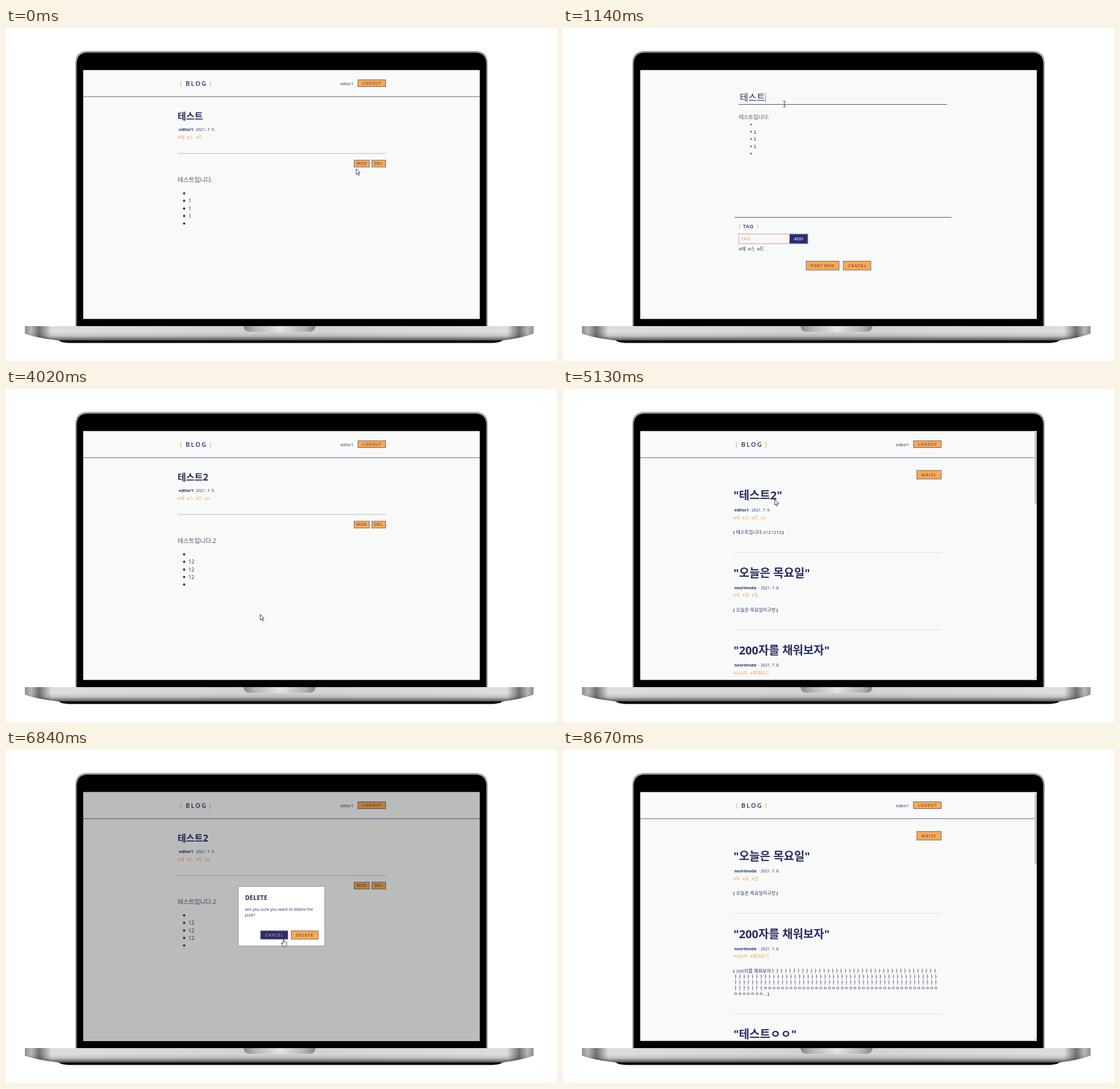
Write an HTML page that moves like this. It is 963x582 px and loops after 8700 ms.

```html
<!DOCTYPE html>
<html lang="ko">
<head>
<meta charset="utf-8">
<title>Blog demo</title>
<style>
html, body { margin: 0; width: 100%; height: 100%; overflow: hidden; background: #fff; }
svg { display: block; width: 963px; height: 582px; }
text { font-family: "Open Sans", "Noto Sans CJK KR", sans-serif; fill: #272e62; white-space: pre; }
.ui { font-family: "Liberation Sans", "Noto Sans CJK KR", sans-serif; }
.b { font-weight: 700; }
.sb { font-weight: 600; }
.soft { fill: #4a5070; }
.or { fill: #f3a052; }
.btn rect { fill: #ffa94f; stroke: #5d5a78; stroke-width: .9; }
.btn.on rect { fill: #28306e; }
.btn.on text { fill: #ffa94f; }
.add rect { fill: #28306e; stroke: none; }
.add text { fill: #fff; }
.add.on rect { fill: #fdf3f3; }
.add.on text { fill: #272e62; }
.head.on text { fill: #9295b7; }
</style>
</head>
<body>
<svg viewBox="0 0 963 582">
  <defs>
    <linearGradient id="base">
      <stop offset="0" stop-color="#8d8d8d"/><stop offset=".012" stop-color="#b8b8b8"/>
      <stop offset=".028" stop-color="#707070"/><stop offset=".052" stop-color="#dedcdc"/>
      <stop offset=".5" stop-color="#d3cfcf"/><stop offset=".948" stop-color="#dedcdc"/>
      <stop offset=".972" stop-color="#707070"/><stop offset=".988" stop-color="#b8b8b8"/>
      <stop offset="1" stop-color="#8d8d8d"/>
    </linearGradient>
    <linearGradient id="shade" x2="0" y2="1">
      <stop offset="0" stop-color="#000" stop-opacity="0"/><stop offset=".45" stop-color="#000" stop-opacity=".12"/>
      <stop offset="1" stop-color="#000" stop-opacity=".62"/>
    </linearGradient>
    <linearGradient id="notch">
      <stop offset="0" stop-color="#858383"/><stop offset=".15" stop-color="#b5b2b2"/>
      <stop offset=".5" stop-color="#e6e3e3"/><stop offset=".85" stop-color="#b5b2b2"/>
      <stop offset="1" stop-color="#858383"/>
    </linearGradient>
    <clipPath id="clip"><rect x="135" y="73.5" width="693" height="435"/></clipPath>
  </defs>
  <path d="M121 521V62Q121 40 143 40H820Q842 40 842 62V521Z" fill="#a3a3a3"/>
  <path d="M123.5 521V63Q123.5 43 143.5 43H819.5Q839.5 43 839.5 63V521Z"/>
  <path d="M90 543H870Q868 550.5 845 550.5H115Q92 550.5 90 543Z" fill="#05050f"/>
  <path id="deck" d="M33 521H922V534Q905 541 868 546H92Q50 541 33 534Z" fill="url(#base)"/>
  <path d="M33 532H922V534Q905 541 868 546H92Q50 541 33 534Z" fill="url(#shade)"/>
  <path d="M415 521H541Q540 531 529 531H427Q416 531 415 521Z" fill="url(#notch)"/>
  <rect x="135" y="73.5" width="693" height="435" fill="#f8fafa"/>
  <g id="screen" clip-path="url(#clip)"></g>
</svg>
<script>
const LOOP = 8700, STEP = 30;
const USER = 'editor1', OTHER = 'noorimoda';
const zones = [];   // hoverable areas
const spans = [];   // parts shown for a limited time

const text = (x, y, size, str, cls = '', ls = 0) =>
  `<text x="${x}" y="${y}" font-size="${size}" class="${cls}" letter-spacing="${ls}">${str}</text>`;
const line = (x1, x2, y, color, w = 1) =>
  `<path d="M${x1} ${y}H${x2}" stroke="${color}" stroke-width="${w}"/>`;
const dot = (x, y, r) => `<circle cx="${x}" cy="${y}" r="${r}" fill="#272e62"/>`;
const during = (from, to, svg) => `<g id="s${spans.push([from, to]) - 1}">${svg}</g>`;
const caret = (from, to, x, y, h) =>
  during(from, to, `<path d="M${x} ${y}v${h}" stroke="#555b80" stroke-width=".7"/>`);
const tags = names => names.map(n => '#' + n).join('\u00a0\u00a0');

function zone(page, x, y, w, h, kind, svg = '', cls = '') {
  const id = 'z' + (zones.push({ page, x, y, w, h, kind }) - 1);
  return `<g id="${id}" class="${cls}">${svg}</g>`;
}
function button(page, label, x, y, w, h, tx, ty, ls = 1.1, font = 'ui', size = 6.3) {
  const svg = `<rect x="${x}" y="${y}" width="${w}" height="${h}"/>` + text(tx, ty, size, label, font, ls);
  return zone(page, x, y, w, h, 'hand', svg, 'btn');
}

function header(page, right) {
  return zone(page, 302, 90, 60, 14, 'hand',
      text(303.5, 101, 11, '{', 'or') + text(314, 101, 11, 'BLOG', 'sb', 2) + text(355, 101, 11, '}', 'or')) +
    text(584.5, 99.8, 6.8, USER) +
    button(page, 'LOGOUT', 615, 90.5, 48.5, 12, 623, 98.9, 1.2) +
    line(100, right, 120, '#5b6585', 1.1);
}
function meta(x, y, who, day) {
  const dx = who === USER ? 26 : 42;
  return text(x, y, 7, who, 'b') + text(x + dx, y, 7, '·') + text(x + dx + 4, y, 7, `2021. 7. ${day}.`);
}

function view(page, extra, tagList) {
  const rows = [289, 302, 315.4, 328.6, 341.8];
  return header(page, 828) +
    text(300, 160, 16, '테스트' + extra, 'b') +
    meta(302, 180.2, USER, 9) +
    text(299.3, 194, 7.7, tags(tagList), 'or') +
    line(300, 664, 219.3, '#b9bbbd') +
    button(page, 'MOD', 608.5, 231, 26.5, 12, 613, 239.4) +
    button(page, 'DEL', 639.5, 231, 24, 12, 643.7, 239.4) +
    text(300, 269, 10.6, '테스트입니다.' + extra, 'soft') +
    rows.map((y, i) => dot(311.3, y, 2) + (i % 4 ? text(318.8, y + 3.4, 9, '1' + extra) : '')).join('');
}

function edit() {
  const rows = [168.7, 181.2, 194, 206.7, 219.2], typed = [0, 1860, 2070, 2280];
  return zone('edit', 307, 108, 364, 29, 'beam') + zone('edit', 307, 146, 364, 180, 'beam') +
    zone('edit', 307, 361, 86, 15, 'beam') +
    text(309, 127.3, 16, '테스트', 'ui') + during(1230, 3570, text(353.6, 127.3, 15.5, '2', 'ui')) +
    line(307, 671, 133.6, '#3d447b') +
    text(307.3, 158.8, 9.2, '테스트입니다.', 'ui soft') + during(1500, 3570, text(360.7, 158.8, 9, '2', 'ui')) +
    rows.map((y, i) => dot(328.6, y, 1.2) + (i % 4 ? text(333, y + 3.3, 9, '1', 'ui') +
      during(typed[i], 3570, text(338, y + 3.3, 9, '2', 'ui')) : '')).join('') +
    caret(960, 1230, 354, 113.5, 17) + caret(1230, 1410, 362.6, 113.5, 17) +
    caret(1410, 1500, 361, 151, 10) + caret(1500, 1740, 366.3, 151, 10) +
    caret(1740, 1860, 338.3, 176, 10) + caret(1860, 1980, 343.3, 176, 10) +
    caret(1980, 2070, 338.3, 189, 10) + caret(2070, 2190, 343.3, 189, 10) +
    caret(2190, 2280, 338.3, 201.5, 10) + caret(2280, 2580, 343.3, 201.5, 10) +
    line(300, 679, 331, '#3d447b') +
    text(307, 349.6, 9, '{', 'or') + text(314.6, 349.6, 9, 'TAG', 'sb', .7) + text(338.4, 349.6, 9, '}', 'or') +
    `<rect x="307" y="360" width="121" height="17" fill="#fdf4f4"/>` +
    zone('edit', 396, 360, 32, 17, 'hand',
      '<rect x="396" y="360" width="32" height="17"/>' + text(403.8, 371, 7.6, 'ADD', 'ui'), 'add') +
    '<rect x="307" y="360" width="121" height="17" fill="none" stroke="#a3a4c2"/>' +
    during(0, 2700, text(311, 371, 7.8, 'TAG', 'ui or', .5)) + during(2910, 3570, text(311, 371, 7.8, 'TAG', 'ui or', .5)) +
    during(2700, 2910, text(311, 371, 7.8, '2', 'ui')) +
    caret(2580, 2700, 311.5, 364, 9) + caret(2700, 2910, 315.8, 364, 9) +
    text(307, 388.7, 7.7, tags(['테', '스', '트'])) + during(2910, 3570, text(355.2, 388.7, 7.7, '#2')) +
    button('edit', 'POST MOD', 425, 407.5, 57.5, 15.5, 433, 417.5, 1) +
    button('edit', 'CANCEL', 490, 407.5, 48, 15.5, 498.6, 417.5);
}

function post(page, y, title, who, day, tagList, body) {
  const last = y + (body.length - 1) * 10.1;
  return zone(page, 298, y - 17, title.length * 17, 22, 'hand', text(298, y, 19.9, `"${title}"`, 'b'), 'head') +
    meta(299.5, y + 20.7, who, day) +
    text(297.2, y + 34.2, 7.7, tags(tagList), 'or') +
    text(297.5, y + 60, 7.8, '(', 'b') +
    body.map((s, i) => text(i ? 298 : 302.5, y + 60 + i * 10.1, 8, s, '', .09)).join('') +
    text(body.length > 1 ? 357.5 : 303.5 + bodyWidth(body[0]), last + 60, 7.8, ')', 'b') +
    line(298, 661, last + 92.2, '#efd9c6');
}
// hangul is wider than latin, spaces and dots are narrow
const bodyWidth = s => [...s].reduce((w, c) => w + (c > 'z' ? 7.45 : /[ .]/.test(c) ? 2.2 : 4.65), 0);

function list(page, withDeleted) {
  const a = n => 'ㅏ'.repeat(n), o = n => 'ㅇ'.repeat(n), gap = 135.5;
  const essay = ['200자를 채워보자' + a(39), a(48), a(48), a(7) + o(41), o(7) + '...'];
  const thursday = y => post(page, y, '오늘은 목요일', OTHER, 8, ['목', '요', '일'], ['오늘은 목요일이구만']);
  const filler = y => post(page, y, '200자를 채워보자', OTHER, 8, ['200자', '채워보기'], essay);
  const y = 193.3;
  return `<g transform="translate(-2.4)">${header(page, 830)}</g>` +
    button(page, 'WRITE', 618.5, 142.3, 42.5, 15, 626.8, 152.6, 1.1, '', 6.8) +
    (withDeleted
      ? post(page, y, '테스트2', USER, 9, ['테', '스', '트', '2'], ['테스트입니다.2121212']) +
        thursday(y + gap) + filler(y + 2 * gap)
      : thursday(y) + filler(y + gap) +
        post(page, y + 311, '테스트ㅇㅇ', OTHER, 8, ['테스트'], ['테스트'])) +
    '<rect x="824" y="73.5" width="4" height="435" fill="#f1f2f2"/>' +
    zone(page, 824, 78, 4, 122, 'arrow', '<rect class="thumb" x="824.3" y="78" width="3.4" height="122" fill="#c1c2c2"/>') +
    '<path d="M824.8 504.5h2.4l-1.2 1.6zM824.8 77h2.4l-1.2 -1.6z" fill="#555"/>';
}

function modal() {
  return '<rect x="406" y="238.5" width="151" height="104" fill="#fff" stroke="#8b8d9c" stroke-width=".9"/>' +
    text(417.7, 262.2, 11, 'DELETE', 'b') +
    text(417.7, 281.4, 7.2, 'Are you sure you want to delete the') + text(417.7, 291, 7.2, 'post?') +
    button('modal', 'CANCEL', 445, 316, 47.5, 14.7, 453.3, 325.8) +
    button('modal', 'DELETE', 498.7, 316, 47, 14.7, 507, 325.8);
}

const pages = {
  view1: view('view1', '', ['테', '스', '트']),
  edit: edit(),
  view2: view('view2', '2', ['테', '스', '트', '2']),
  list1: list('list1', true),
  list2: list('list2', false)
};
const shapes = {
  arrow: 'M0 0V10L2.3 7.9 3.9 11.6 5.5 10.9 3.9 7.3H7Z',
  hand: 'M-.9 .8Q0 -.4 .9 .8V4.2Q2 3.4 2.7 4.5 3.9 3.9 4.4 5 5.7 4.7 5.7 6.2V8.4Q5.4 10 4.6 12H-.9Q-2 9.6 -4 7.3 -3.6 5.6 -2.2 6.4L-.9 7.6Z',
  beam: 'M-2.4 -5H-.6L0 -4.4 .6 -5H2.4M0 -4.4V4.4M-2.4 5H-.6L0 4.4 .6 5H2.4'
};

const $ = id => document.getElementById(id);
$('screen').innerHTML =
  Object.entries(pages).map(([id, svg]) => `<g id="${id}">${svg}</g>`).join('') +
  '<rect id="dim" x="135" y="73.5" width="693" height="434"/>' +
  `<g id="modal">${modal()}</g>` +
  '<path id="cursor" fill="#fff" stroke="#111" stroke-width=".8" stroke-linejoin="round"/>';

const route = [[0, 'view1'], [420, 'edit'], [3570, 'view2'], [4380, 'list1'],
  [5220, 'view2'], [7890, 'list1'], [8190, 'list2']];
const fades = [[5790, 120, 1], [6900, 90, -1], [7170, 120, 1], [7650, 90, -1]];
// time, x, y
const track = [[0, 612, 246], [300, 622, 239], [450, 622, 239], [930, 388, 132], [1140, 387, 133],
  [1230, 387, 133], [1380, 364, 157], [1530, 364, 157], [1740, 340, 181], [1890, 340, 181],
  [1980, 340, 194], [2100, 340, 194], [2190, 340, 206], [2310, 340, 206], [2550, 362, 369],
  [2700, 362, 369], [2820, 411, 378], [2940, 411, 378], [3240, 455, 422], [3960, 455, 422],
  [4290, 332, 98], [4410, 332, 98], [4800, 370, 193], [5250, 370, 193], [5400, 425, 208],
  [5580, 425, 208], [5760, 655, 238], [6090, 655, 238], [6360, 486, 340], [6690, 486, 340],
  [6780, 485, 331], [6930, 485, 331], [7140, 658, 237], [7350, 658, 237], [7590, 521, 325],
  [8190, 521, 325], [8640, 842, 140]];

const clamp = v => Math.min(1, Math.max(0, v));
const current = (table, t) => table.filter(r => r[0] <= t).pop();

function pointer(t) {
  const i = track.indexOf(current(track, t)), a = track[i], b = track[i + 1] || a;
  const p = clamp((t - a[0]) / (b[0] - a[0] || 1)), e = p * p * (3 - 2 * p);
  return [a[1] + (b[1] - a[1]) * e, a[2] + (b[2] - a[2]) * e];
}

function render(t) {
  const page = current(route, t)[1];
  for (const id in pages) $(id).style.display = id === page ? '' : 'none';
  spans.forEach(([from, to], i) => { $('s' + i).style.display = t >= from && t < to ? '' : 'none'; });

  const dim = fades.reduce((v, [at, len, dir]) => v + dir * clamp((t - at) / len), 0);
  $('dim').style.opacity = dim * .25;
  $('modal').style.opacity = dim;

  const [x, y] = pointer(t), layer = dim > 0 ? 'modal' : page, pad = 1.5;
  let kind = 'arrow';
  zones.forEach((z, i) => {
    const hit = z.page === layer && x > z.x - pad && x < z.x + z.w + pad && y > z.y - pad && y < z.y + z.h + pad;
    const el = $('z' + i), thumb = el.querySelector('.thumb');
    el.classList.toggle('on', hit);
    if (thumb) thumb.setAttribute('fill', hit ? '#a8a8a8' : '#c1c2c2');
    if (hit) kind = z.kind;
  });
  const cur = $('cursor');
  cur.setAttribute('d', shapes[kind]);
  cur.setAttribute('transform', `translate(${x.toFixed(1)} ${y.toFixed(1)})`);
}

const start = performance.now();
function tick() {
  const t = (performance.now() - start) % LOOP;
  render(Math.floor(t / STEP) * STEP);
  requestAnimationFrame(tick);
}
tick();
</script>
</body>
</html>
```
